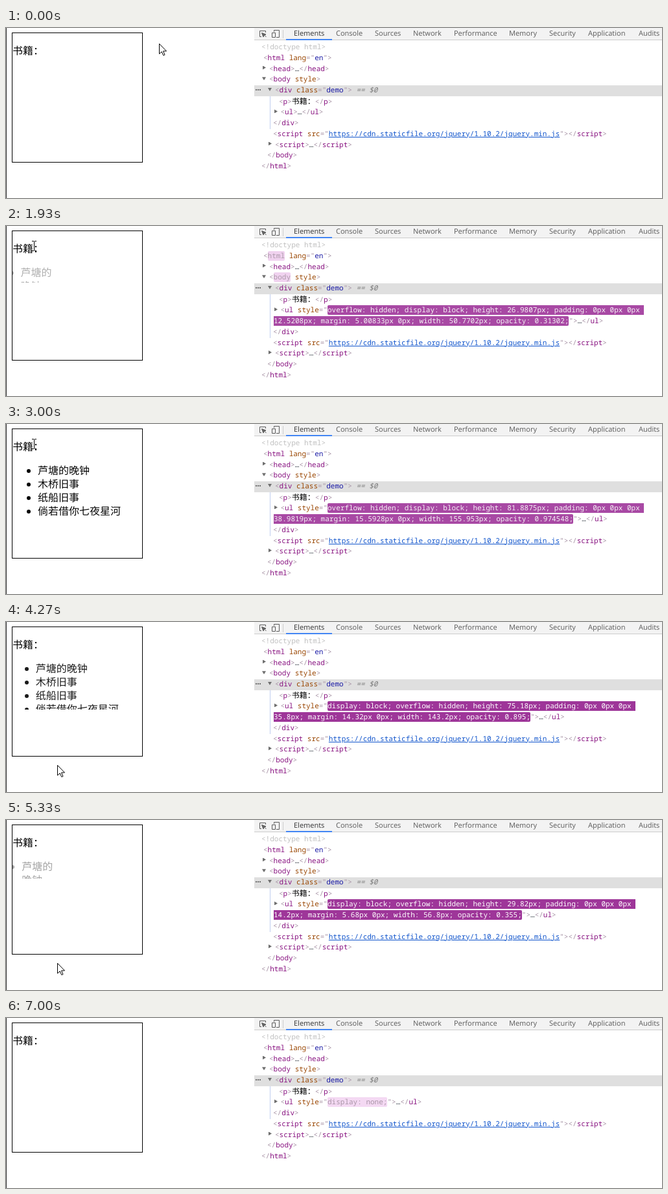
An HTML page for the animation above (7070 ms loop, 1012 by 264 pixels).

```html
<!DOCTYPE html>
<html lang="zh-CN">
<head>
<meta charset="utf-8">
<title>Show and hide</title>
<style>
html, body { margin: 0; width: 1012px; height: 264px; overflow: hidden; background: #fff; }
body { position: relative; text-rendering: geometricPrecision; }
body, .cjk { font-family: "Noto Sans CJK SC", "Noto Sans CJK", "Noto Sans", sans-serif; }
[hidden] { display: none !important; }

/* page */
.edge { position: absolute; left: 0; top: 0; width: 1px; height: 264px; background: #333; }
.demo { position: absolute; left: 9px; top: 7px; width: 200px; height: 200px; border: 1px solid #000; font-size: 16px; font-weight: 300; line-height: 21px; }
.demo p { position: absolute; margin: 0; left: 0; top: 16px; }
#list { position: absolute; left: 0; top: 53px; margin: 0; padding: 0; list-style: none; overflow: hidden; }
#list li { position: relative; }
#list li::before { content: ""; position: absolute; left: -17px; top: 9px; width: 6px; height: 6px; border-radius: 50%; background: #000; }

/* toolbar */
.bar { position: absolute; left: 383px; top: 0; width: 629px; height: 18px; background: #f3f3f3; border-bottom: 1px solid #ccc; font: 11px/18px "Open Sans", "Noto Sans", sans-serif; color: #5a5a5a; }
.bar span { position: absolute; top: 0; white-space: nowrap; }
.bar .on { color: #333; }
.bar .on::after { content: ""; position: absolute; left: -12px; right: -12px; top: 17px; height: 2px; background: #4285f4; }
.bar svg { position: absolute; left: 0; top: 0; fill: none; stroke: #5a5a5a; }

/* element tree */
.tree { position: absolute; left: 383px; top: 22.2px; width: 629px; font: 500 11px/16.7px "Noto Sans Mono", "DejaVu Sans Mono", monospace; color: #a894a6; }
.row { position: relative; padding-left: var(--x); white-space: pre; }
.row.pick { background: #dfdfdf; }
.row.pick em { color: #7a7a7a; }
.row.pick::after { content: ""; position: absolute; left: 2px; top: 6px; width: 2px; height: 2px; background: #6e6e6e; box-shadow: 3px 0 #6e6e6e, 6px 0 #6e6e6e; }
.shut::before, .open::before { content: ""; position: absolute; background: #6e6e6e; left: calc(var(--x) - 10px); top: 3px; width: 5px; height: 6px; clip-path: polygon(0 0, 100% 50%, 0 100%); }
.open::before { left: calc(var(--x) - 11px); top: 4px; width: 6px; height: 5px; clip-path: polygon(0 0, 100% 0, 50% 100%); }
.nest { position: relative; }
.nest::before { content: ""; position: absolute; left: 24px; top: 0; bottom: 0; border-left: 1px solid #c0cff0; }
.wrap { padding-left: 30px; text-indent: 10.4px; width: 598px; white-space: pre-wrap; }
.tag { color: #881280; }
.attr { color: #994500; }
.val { color: #1a1aa6; }
.link { color: #1155cc; text-decoration: underline; }
.text { color: #000; font-size: 12px; font-weight: 400; }
.more { color: #303942; }
.dim { color: #c0c0c0; }
.flash { border-radius: 2px; animation: flash 1.4s cubic-bezier(0, 0, .2, 1) paused; }
@keyframes flash {
  from { background: #9e3699; color: #fff; }
  80% { background: #f5dbf4; color: #a894a6; }
  to { background: #f5dbf400; }
}

.cursor { position: absolute; left: 0; top: 0; overflow: visible; }
</style>
</head>
<body>
<div class="edge"></div>
<div class="demo">
  <p>书籍：</p>
  <ul id="list"><li>芦塘的晚钟</li><li>木桥旧事</li><li>纸船旧事</li><li>倘若借你七夜星河</li></ul>
</div>

<div class="bar">
  <svg width="50" height="18">
    <path d="M11 13.5H8.5V4.5H17.5V7"/>
    <path d="M11.5 7.5L18 10L15.5 11L18.5 14M11.5 7.5L14 14L15.3 11.2" fill="#5a5a5a"/>
    <path d="M30.5 6V3.5H38.5V14.5H34M27.5 7.5H32.5V14.5H27.5Z"/>
    <path d="M44.5 3V16" stroke="#ccc"/>
  </svg>
  <span class="on" style="left:61px">Elements</span>
  <span style="left:126px">Console</span>
  <span style="left:186px">Sources</span>
  <span style="left:245px">Network</span>
  <span style="left:308px">Performance</span>
  <span style="left:393px">Memory</span>
  <span style="left:455px">Security</span>
  <span style="left:515px">Application</span>
  <span style="left:593px">Audits</span>
</div>

<div class="tree">
  <div class="row dim" style="--x:11px">&lt;!doctype html&gt;</div>
  <div class="row" style="--x:14px">&lt;<span class="tag flash" id="htmlTag">html</span> <span class="attr">lang</span>="<span class="val">en</span>"&gt;</div>
  <div class="row shut" style="--x:23px">&lt;<span class="tag">head</span>&gt;<span class="more">…</span>&lt;/<span class="tag">head</span>&gt;</div>
  <div class="row open" style="--x:23px">&lt;<span class="tag flash" id="bodyTag">body</span> <span class="attr">style</span>&gt;</div>
  <div class="row open pick" style="--x:32px">&lt;<span class="tag">div</span> <span class="attr">class</span>="<span class="val">demo</span>"&gt;<em> == $0</em></div>
  <div class="nest">
    <div class="row" style="--x:38px">&lt;<span class="tag">p</span>&gt;<span class="text cjk">书籍：</span>&lt;/<span class="tag">p</span>&gt;</div>
    <div class="row shut wrap" style="--x:41px">&lt;<span class="tag">ul</span><span id="attr"> <span class="attr flash" id="attrName">style</span><span id="attrValue">="<span class="val flash" id="value"></span>"</span></span>&gt;<span class="more">…</span>&lt;/<span class="tag">ul</span>&gt;</div>
    <div class="row" style="--x:29px">&lt;/<span class="tag">div</span>&gt;</div>
  </div>
  <div class="row" style="--x:29px">&lt;<span class="tag">script</span> <span class="attr">src</span>="<span class="link">https://cdn.staticfile.org/jquery/1.10.2/jquery.min.js</span>"&gt;&lt;/<span class="tag">script</span>&gt;</div>
  <div class="row shut" style="--x:32px">&lt;<span class="tag">script</span>&gt;<span class="more">…</span>&lt;/<span class="tag">script</span>&gt;</div>
  <div class="row" style="--x:20px">&lt;/<span class="tag">body</span>&gt;</div>
  <div class="row" style="--x:11px">&lt;/<span class="tag">html</span>&gt;</div>
</div>

<svg class="cursor" width="1" height="1">
  <g id="cursor">
    <path id="arrow" d="M.5 .5V16.2L4.2 12.8L6.8 18.6L9 17.6L6.5 11.9H11.5Z" fill="#fff" stroke="#000"/>
    <path id="beam" d="M-3 -7.5H0M1 -7.5H4M.5 -7V7M-3 7.5H0M1 7.5H4" fill="none" stroke="#000"/>
  </g>
</svg>

<script>
const LOOP = 7070, FIRST = 330, STEP = 200 / 3;
const ATTR_AT = 725, SHOW_AT = 1154.6, SHOW_MS = 2051, SHOWN_AT = 3190;
const HIDE_AT = 4055.9, HIDE_MS = 1975.4, HIDDEN_AT = HIDE_AT + HIDE_MS;

// time, x, y
const path = [
  [263, 236, 24], [530, 188, 6], [800, 124, 6], [1000, 83, 12], [1130, 57, 25],
  [1263, 43, 31], [3263, 43, 31], [3600, 56, 90], [3930, 76, 189], [4063, 79, 216],
  [4130, 79, 222], [6030, 79, 222], [6130, 77, 229], [6330, 72, 245], [6530, 64, 268]
];

const $ = id => document.getElementById(id);
const [list, cursor, arrow, beam, attr, attrName, attrValue, value, htmlTag, bodyTag] =
  ["list", "cursor", "arrow", "beam", "attr", "attrName", "attrValue", "value", "htmlTag", "bodyTag"].map($);
const num = v => +v.toPrecision(6);
const px = v => num(v) + "px";
const tick = x => Math.round(x * 2000) / 2000;
const flash = (el, age) => { el.style.animationDelay = -age + "ms"; };

// The screen refreshes fifteen times a second after the first pause.
function snap(t) {
  if (t < FIRST) return 0;
  const n = Math.floor((Math.floor(t / 10) * 10 - FIRST) / STEP + 1e-6);
  return FIRST + n * STEP;
}

function pointAt(t) {
  const i = path.findIndex(k => k[0] > t);
  if (i === 0) return path[0].slice(1);
  if (i < 0) return path.at(-1).slice(1);
  const [t0, x0, y0] = path[i - 1], [t1, x1, y1] = path[i];
  const f = (t - t0) / (t1 - t0);
  return [x0 + (x1 - x0) * f, y0 + (y1 - y0) * f].map(Math.round);
}

function drawCursor(t) {
  const [x, y] = pointAt(t);
  const overText = (x < 50 && y > 24 && y < 45) || (x > 50 && x < 114 && y > 61 && y < 145);
  cursor.setAttribute("transform", `translate(${x} ${y})`);
  arrow.style.display = overText ? "none" : "";
  beam.style.display = overText ? "" : "none";
}

// Size of the list at progress p, growing from a base of one or zero pixels.
function sizeAt(p, base) {
  return {
    height: base + (84 - base) * p, pad: 40 * p, margin: 16 * p,
    width: base + (160 - base) * p, opacity: p
  };
}

function styleText(s) {
  return `height: ${px(s.height)}; padding: 0px 0px 0px ${px(s.pad)}; ` +
    `margin: ${px(s.margin)} 0px; width: ${px(s.width)}; opacity: ${num(s.opacity)};`;
}

function drawList(t) {
  let size = null, text = "", age = 0;
  if (t >= HIDDEN_AT) {
    text = "display: none;";
    age = t - HIDDEN_AT;
  } else if (t >= HIDE_AT) {
    size = sizeAt(1 - tick((t - HIDE_AT) / HIDE_MS), 0);
    text = "display: block; overflow: hidden; " + styleText(size);
  } else if (t >= SHOWN_AT) {
    size = sizeAt(1, 0);
    text = "display: block;";
    age = t - SHOWN_AT;
  } else if (t >= SHOW_AT) {
    const x = tick((t - SHOW_AT) / SHOW_MS);
    size = sizeAt(.5 - Math.cos(Math.PI * x) / 2, 1);
    text = "overflow: hidden; display: block; " + styleText(size);
    age = 35;
  }

  list.hidden = !size;
  if (size) {
    Object.assign(list.style, {
      height: px(size.height), width: px(size.width),
      paddingLeft: px(size.pad), opacity: size.opacity
    });
  }
  attr.hidden = t < ATTR_AT;
  attrValue.hidden = !text;
  if (value.textContent !== text) value.textContent = text;
  flash(value, age);
  flash(attrName, text ? 1400 : t - ATTR_AT);
}

function draw() {
  const t = snap(performance.now() % LOOP);
  drawCursor(t);
  drawList(t);
  flash(htmlTag, t - SHOW_AT);
  flash(bodyTag, t - SHOW_AT);
  requestAnimationFrame(draw);
}
draw();
</script>
</body>
</html>
```
